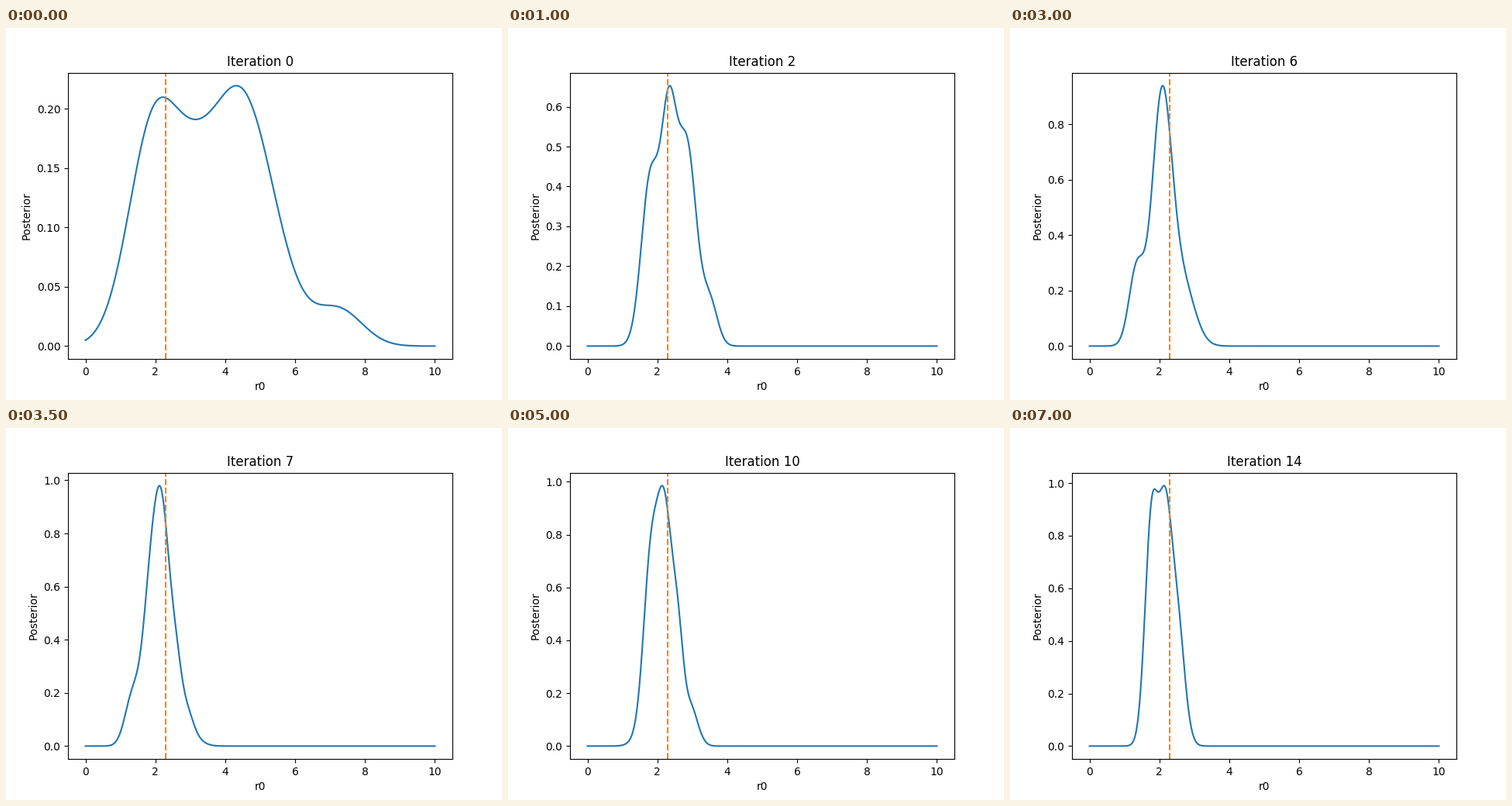
A matplotlib script for the animation above (7.5 s loop, 640 by 480 pixels).

```python
import numpy as np
import matplotlib.pyplot as plt
from matplotlib.animation import FuncAnimation

plt.rcParams["text.kerning_factor"] = 6

ITERATIONS = 15
TRUE_R0 = 2.3
x = np.linspace(0, 10, 1000)


def mixture(peak, *bumps):
    """Sum of Gaussian bumps (centre, width, height), scaled to a peak."""
    y = sum(h * np.exp(-0.5 * ((x - c) / w) ** 2) for c, w, h in bumps)
    return y * peak / y.max()


# Posterior at key iterations; the ones between are blended.
KEYS = {
    0: mixture(0.2195, (1.97, 0.73, 0.189), (3.08, 0.6, 0.053),
               (4.43, 0.966, 0.217), (7.25, 0.68, 0.0305)),
    1: mixture(0.39, (2.1, 0.6, 0.33), (3.2, 0.8, 0.24)),
    2: mixture(0.6527, (1.8, 0.26, 0.425), (2.33, 0.22, 0.53),
               (2.85, 0.27, 0.5), (3.5, 0.22, 0.11)),
    4: mixture(0.784, (1.78, 0.21, 0.6), (2.23, 0.22, 0.585),
               (2.67, 0.27, 0.5)),
    6: mixture(0.94, (1.35, 0.22, 0.28), (2.07, 0.28, 0.89),
               (2.65, 0.35, 0.23)),
    9: mixture(1.072, (1.8, 0.2, 0.68), (2.2, 0.2, 0.92),
               (2.58, 0.17, 0.41), (2.98, 0.13, 0.07)),
    12: mixture(0.851, (1.95, 0.32, 0.79), (2.55, 0.27, 0.43),
                (3.08, 0.18, 0.18)),
    14: mixture(0.99, (1.78, 0.19, 0.85), (2.16, 0.18, 0.73),
                (2.5, 0.21, 0.48)),
}


def posterior(i):
    lo = max(k for k in KEYS if k <= i)
    hi = min(k for k in KEYS if k >= i)
    mix = (i - lo) / (hi - lo) if hi > lo else 0
    return (1 - mix) * KEYS[lo] + mix * KEYS[hi]


fig, ax = plt.subplots(figsize=(6.4, 4.8), dpi=100)


def draw(i):
    ax.clear()
    ax.plot(x, posterior(i), color="C0")
    ax.axvline(TRUE_R0, color="C1", linestyle="--")
    ax.set_title(f"Iteration {i}")
    ax.set_xlabel("r0")
    ax.set_ylabel("Posterior")


anim = FuncAnimation(fig, draw, frames=ITERATIONS, interval=500,
                     repeat=True, repeat_delay=0)
plt.show()
```
